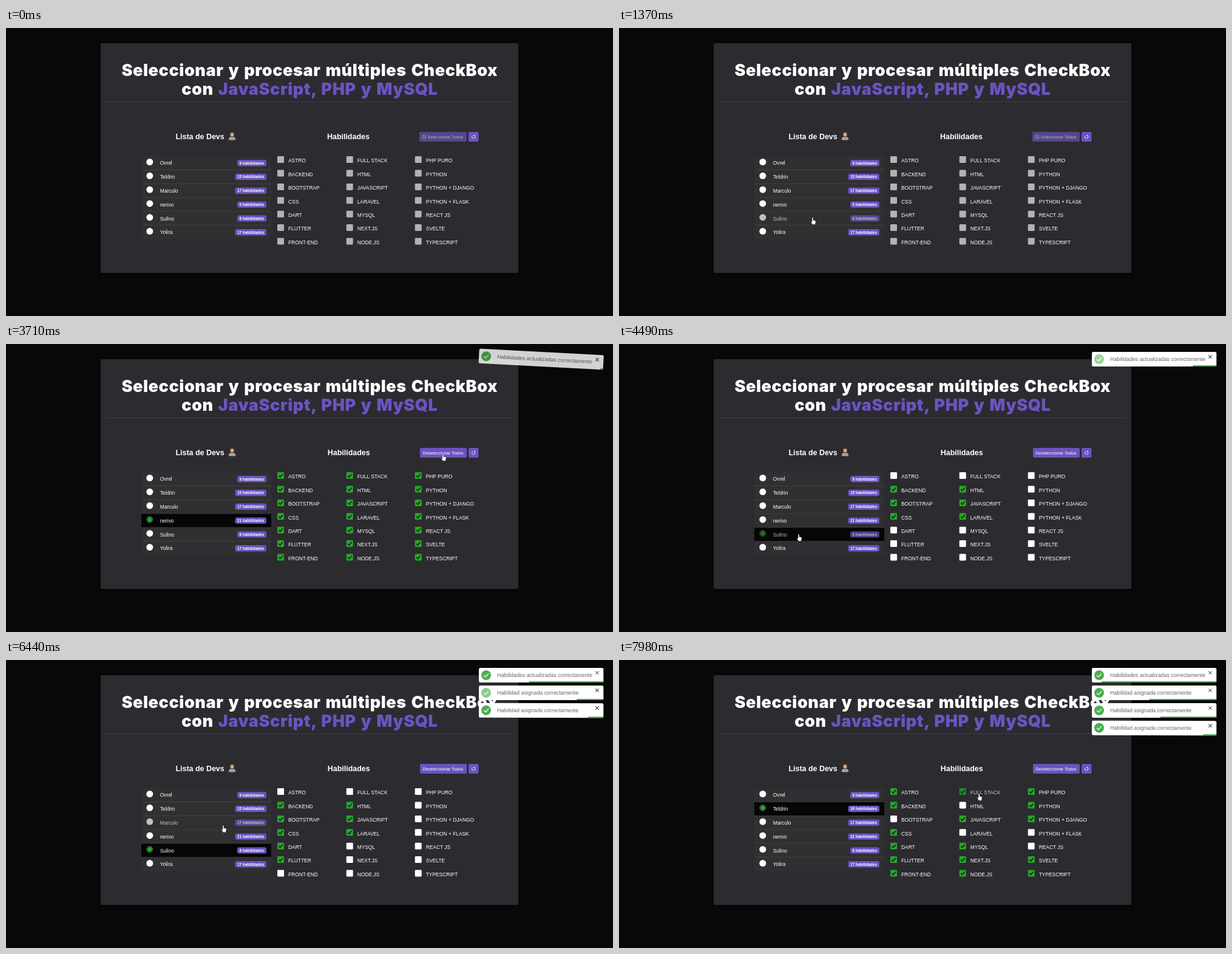
Animation of 1000x474 px, one loop 8000 ms. Source, as an HTML page:

```html
<!DOCTYPE html>
<html lang="es">
<head>
<meta charset="utf-8">
<title>Seleccionar CheckBox</title>
<style>
  html, body { margin: 0; width: 100%; height: 100%; overflow: hidden; background: #080808; }
  svg { display: block; width: 100vw; height: 100vh; }
  text { font-family: "Liberation Sans", Arial, sans-serif; font-size: 8.4px; fill: #fff; }
  .title { font: 900 27px Inter, sans-serif; letter-spacing: .6px; word-spacing: 2px; text-anchor: middle; }
  .head { font-weight: 700; font-size: 12.45px; }
  .button { font-size: 7.25px; }
  .badge { font-weight: 700; font-size: 6.4px; text-anchor: end; }
  .toast { font-size: 8.85px; fill: #666; }
</style>
</head>
<body>
<svg id="stage" viewBox="0 0 1000 474"></svg>
<script>
const LOOP = 8000;
const PURPLE = '#6b53c0';
const GREEN = '#4caf50';
const ROW = 22.8, SKILL_ROW = 22.4;
const COLUMNS = [447, 560.7, 673.7];

const devs = ['Ovrel', 'Teldrin', 'Marculo', 'nerivo', 'Sulino', 'Yolira'];
const skills = [
  'ASTRO', 'BACKEND', 'BOOTSTRAP', 'CSS', 'DART', 'FLUTTER', 'FRONT-END',
  'FULL STACK', 'HTML', 'JAVASCRIPT', 'LARAVEL', 'MYSQL', 'NEXT.JS', 'NODE.JS',
  'PHP PURO', 'PYTHON', 'PYTHON + DJANGO', 'PYTHON + FLASK', 'REACT JS', 'SVELTE', 'TYPESCRIPT'
];

const CLICK = { dev4: 2080, all: 3510, dev5: 4390, dart: 5260, flutter: 5790, dev2: 6650, backend: 7290 };
const toasts = [
  [3586, 'Habilidades actualizadas correctamente'],
  [5400, 'Habilidad asignada correctamente'],
  [5826, 'Habilidad asignada correctamente'],
  [7453, 'Habilidad asignada correctamente']
];

// Pointer path: time, x, y of the tip
const path = [
  [230, 560, 300], [870, 352, 407], [1020, 345, 410], [1370, 319, 312], [1550, 319, 312],
  [1860, 290, 291], [2250, 290, 291], [2400, 340, 296], [2610, 370, 300], [2730, 455, 307],
  [2940, 610, 240], [3080, 640, 225], [3240, 720, 181], [3700, 720, 181], [4380, 296, 313],
  [4600, 296, 313], [5200, 474, 308], [5450, 474, 308], [5740, 474, 331], [6050, 474, 331],
  [6600, 300, 243], [6700, 300, 243], [7100, 472, 238], [7480, 472, 238], [7960, 593, 220]
];

const rect = (x, y, w, h, fill, r = 0) =>
  `<rect x="${x}" y="${y}" width="${w}" height="${h}" rx="${r}" fill="${fill}"/>`;
const circle = (x, y, r, fill, extra = '') =>
  `<circle cx="${x}" cy="${y}" r="${r}" fill="${fill}" ${extra}/>`;
const line = (d, color, width) =>
  `<path d="${d}" fill="none" stroke="${color}" stroke-width="${width}"/>`;
const text = (x, y, value, type = '') => `<text x="${x}" y="${y}" class="${type}">${value}</text>`;
const group = (opacity, content) => `<g opacity="${opacity}">${content}</g>`;

function snap(t) {
  return t < 4390 ? Math.max(0, 10 + 80 * Math.floor((t - 10) / 80))
                  : 4390.5 + 96.5 * Math.floor((t - 4390.5) / 96.5);
}

function pointerAt(t) {
  if (t < path[0][0]) return null;
  const next = path.findIndex(p => p[0] > t);
  if (next < 0) return path.at(-1).slice(1);
  const [t0, x0, y0] = path[next - 1], [t1, x1, y1] = path[next];
  const k = (t - t0) / (t1 - t0);
  return [x0 + (x1 - x0) * k, y0 + (y1 - y0) * k];
}

function stateAt(t) {
  const selected = t >= CLICK.dev2 ? 1 : t >= CLICK.dev5 ? 4 : t >= CLICK.dev4 ? 3 : -1;
  const counts = [
    9, t >= CLICK.backend ? 16 : 15, 17, t >= CLICK.all ? 21 : 0,
    6 + (t >= CLICK.dart) + (t >= CLICK.flutter), 17
  ];
  const missing = ['BOOTSTRAP', 'HTML', 'LARAVEL', 'PYTHON + FLASK', 'REACT JS'];
  const checked = name => {
    if (selected === 1) return name === 'BACKEND' ? t >= CLICK.backend : !missing.includes(name);
    if (selected === 4) return ['BACKEND', 'BOOTSTRAP', 'CSS', 'HTML', 'JAVASCRIPT', 'LARAVEL'].includes(name)
      || name === 'DART' && t >= CLICK.dart || name === 'FLUTTER' && t >= CLICK.flutter;
    return selected === 3 && t >= CLICK.all;
  };
  return { selected, counts, checked, enabled: selected >= 0, all: t >= CLICK.all };
}

function hoverAt(pointer, enabled) {
  const hover = { dev: -1, skill: -1, button: false };
  if (!pointer) return hover;
  const [x, y] = pointer;
  if (x > 223 && x < 437 && y > 211 && y < 348) hover.dev = Math.floor((y - 211) / ROW);
  const column = COLUMNS.findIndex(c => x > c + 16 && x < c + 70);
  const row = Math.floor((y - 208) / SKILL_ROW);
  if (enabled && column >= 0 && row >= 0 && row < 7) hover.skill = column * 7 + row;
  hover.button = enabled && x > 681 && x < 778 && y > 171 && y < 187;
  return hover;
}

const emoji =
  '<path d="M366 184q0-5 6.5-5t6.5 5z" fill="#6d6d75"/>' +
  circle(372.5, 174.8, 3.4, '#8a6f50') + circle(372.5, 175.8, 2.7, '#dba884') +
  rect(368, 179.5, 9, 5, '#a9a9ae', .8) + circle(372.5, 182, .8, '#66666c');

const backdrop =
  rect(0, 0, 1000, 474, '#080808') + rect(156, 25, 688, 378, '#2c2b30', 3) +
  text(500.3, 79, 'Seleccionar y procesar múltiples CheckBox', 'title') +
  text(500.3, 110, `con <tspan fill="${PURPLE}">JavaScript, PHP y MySQL</tspan>`, 'title') +
  '<path d="M166 121.500H836" stroke="#48416c" stroke-dasharray="2 1"/>' +
  text(279.5, 182.5, 'Lista de Devs', 'head') + emoji;

function buttons({ enabled, all }) {
  const label = all
    ? rect(682, 171, 77, 16, PURPLE, 2) + text(686.3, 181.6, 'Deseleccionar Todos', 'button')
    : rect(681, 171, 78, 16, PURPLE, 2) + text(694.3, 181.6, 'Seleccionar Todos', 'button') +
      line('M691.5 178.5v3.3h-5.3v-5.3h4M687.5 178.7l1.5 1.5 3.3-3.8', '#fff', .7);
  const reset = rect(762, 171, 16.5, 16, PURPLE, 2) +
    line('M768.6 177.2a2.6 2.6 0 1 0 3.2 0M770 176.4h2.2v2', '#fff', .8);
  return text(all ? 529.8 : 529, 182.5, 'Habilidades', 'head') + group(enabled ? 1 : .65, label) + reset;
}

function devRow(name, i, state, hover) {
  const top = 211 + ROW * i, middle = top + 11.2, selected = i === state.selected;
  const radio = selected
    ? circle(236.8, middle - 1.7, 4.9, '#101810', 'stroke="#5b8a5b" stroke-width="1"') +
      circle(236.8, middle - 1.7, 3.6, '#2aa82d')
    : circle(236.8, middle - 1.7, 5.5, '#fff');
  const count = state.counts[i], width = count > 9 ? 51.5 : 48;
  const content = radio + text(253.7, middle + 3.2, name) +
    rect(429 - width, middle - 5.2, width, 10.4, PURPLE, 3) +
    text(425, middle + 2.3, `${count} habilidades`, 'badge');
  return rect(223, top, 214, ROW, selected ? '#060606' : '#302f31') +
    (i < 5 ? rect(223, top + ROW - .5, 214, .8, '#55555a') : '') +
    group(hover.dev === i ? .7 : 1, content);
}

function skillBox(name, i, state, hover) {
  const x = COLUMNS[Math.floor(i / 7)], y = 211.1 + SKILL_ROW * (i % 7);
  const checked = state.checked(name);
  const box = rect(x, y, 11, 11, checked ? '#27a52b' : state.enabled ? '#fff' : '#b3b3b3', 1.4) +
    (checked ? line(`M${x + 2.4} ${y + 5.6}l2.3 2.4 4.2-5`, '#0c1c0e', 1.5) : '');
  return group(hover.skill === i ? .72 : 1, box + text(x + 18, y + 10.3, name));
}

function toast([start, message], i, t) {
  const age = t - start;
  if (age < 0) return '';
  const y = 13 + 29 * i;
  const tilt = 6 * Math.exp(-age / 150);
  const bar = Math.min(205, age * .0433);
  const iconOpacity = 1 - .5 * Math.max(0, 1 - Math.abs(age - 930) / 300);
  const icon = circle(791, y + 12, 8, GREEN) + line(`M787.2 ${y + 12.2}l2.7 2.7 5-5.5`, '#fff', 1.3);
  return `<g transform="rotate(${tilt} 882 ${y + 12})" opacity="${Math.min(1, .3 + age / 200)}">` +
    rect(779, y, 205.3, 24, '#fff', 2.5) + group(iconOpacity, icon) +
    text(809, y + 14.8, message, 'toast') +
    line(`M971.2 ${y + 5.2}l5.4 5.4m0-5.4l-5.4 5.4`, '#333', 1) +
    rect(984.3 - bar, y + 22, bar, 2, GREEN) + '</g>';
}

function cursor(pointer, hand) {
  if (!pointer) return '';
  const shape = hand
    ? 'M-1 1q0-1.2 1-1.2t1 1.2v3.2l3.3.7q1 .3.9 1.5l-.6 3.3-.6 1.8h-4.3l-2.4-4q-.6-1.3.5-1.3l1.2 1z'
    : 'M0 0v8l1.8-1.6 1.3 2.9 1.4-.6-1.3-2.8h2.5z';
  return `<path d="${shape}" transform="translate(${pointer})" fill="#fff" stroke="#111" stroke-width=".5"/>`;
}

const stage = document.getElementById('stage');

function render(t) {
  const state = stateAt(t), pointer = pointerAt(t), hover = hoverAt(pointer, state.enabled);
  const hand = hover.dev >= 0 || hover.skill >= 0 || hover.button;
  stage.innerHTML = backdrop + buttons(state) +
    devs.map((name, i) => devRow(name, i, state, hover)).join('') +
    skills.map((name, i) => skillBox(name, i, state, hover)).join('') +
    toasts.map((item, i) => toast(item, i, t)).join('') +
    cursor(pointer, hand);
}

const begin = performance.now();
let shown = -1;
function tick() {
  const t = snap((performance.now() - begin) % LOOP);
  if (t !== shown) render(shown = t);
  requestAnimationFrame(tick);
}
tick();
</script>
</body>
</html>
```
